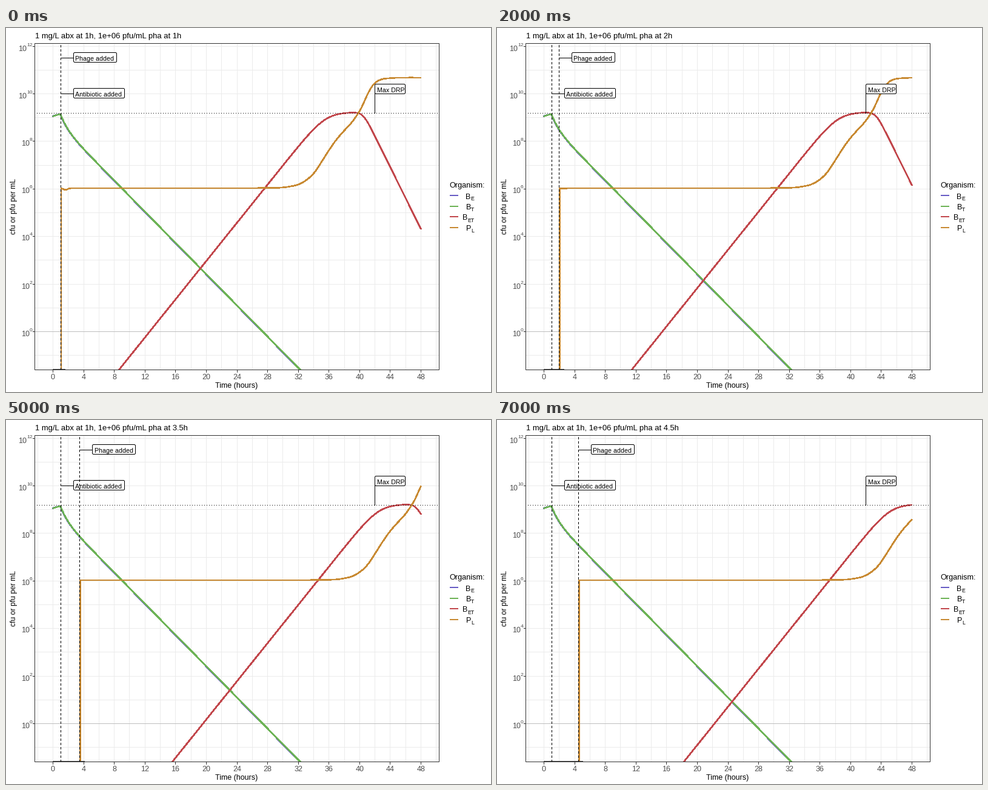
A matplotlib script for the animation above (8000 ms loop, 800 px wide and 600 px high).

```python
import itertools

import matplotlib.pyplot as plt
import numpy as np
from matplotlib.animation import FuncAnimation
from matplotlib.patches import FancyBboxPatch, Rectangle

W, H, DPI = 800, 600, 100
PX = 72 / DPI  # points per pixel
LEFT, RIGHT, TOP, BOTTOM = 47, 714, 24, 562
BLUE, GREEN, RED, ORANGE = "#685cc4", "#6db356", "#c2484d", "#c88a33"
GREY, DARK, GRID = "#4d4d4d", "#333333", "#ebebeb"
FRAMES = 8

plt.rcParams["font.family"] = "Liberation Sans"
fig = plt.figure(figsize=(W / DPI, H / DPI), dpi=DPI, facecolor="white")
ax = fig.add_axes([0, 0, 1, 1])
layer = itertools.count(1)


def hour_x(h):
    return 77 + 12.646 * h


def decade_y(d):
    return 499 - 39.2 * d


def softplus(v, width):
    return width * np.logaddexp(0, v / width)


def smooth(x, knots):
    """Cubic Hermite curve through a few (x, y) knots."""
    kx, ky = np.array(knots, float).T
    slope = np.gradient(ky, kx)
    i = np.clip(np.searchsorted(kx, x) - 1, 0, len(kx) - 2)
    step = kx[i + 1] - kx[i]
    u = (x - kx[i]) / step
    return ((1 + 2 * u) * (1 - u) ** 2 * ky[i] + u * (1 - u) ** 2 * step * slope[i]
            + u * u * (3 - 2 * u) * ky[i + 1] + u * u * (u - 1) * step * slope[i + 1])


PHAGE = [(-60, 264), (380, 264), (400, 264), (430, 263.5), (457, 262.8),
         (470, 261), (482, 258), (495, 251), (508, 239), (520, 221.5),
         (533, 201), (545, 184), (558, 169), (570, 156), (580, 142),
         (586, 132), (591, 121), (597, 108), (604, 96), (612, 88),
         (620, 84.5), (633, 82.7), (650, 82), (700, 82)]


def line(xs, ys, color, width=1, dash=None, clip=None):
    style = (0, dash) if dash else "-"
    art, = ax.plot(xs, ys, color=color, lw=width * PX, ls=style, zorder=next(layer),
                   antialiased=False, solid_capstyle="butt")
    if clip is not None:
        art.set_clip_path(clip)


def stroke(xs, ys, color, clip=None):
    """Two-pixel line, centred on the upper edge of its pixel row."""
    line(xs, np.asarray(ys) - 1, color, 1.6, clip=clip)


def text(x, y, s, size, color="black", ha="left", **kw):
    ax.text(x, y, s, fontsize=size * PX, color=color, ha=ha,
            va=kw.pop("va", "baseline"), zorder=next(layer), **kw)


def tag(x, y, w, s):
    ax.add_patch(FancyBboxPatch(
        (x + 0.5, y - 0.5), w, 16, boxstyle="round,pad=0,rounding_size=2",
        fc="white", ec="black", lw=PX, zorder=next(layer)))
    text(x + 3.5, y + 13, s, 10.65)


def event(x, y, w, s):
    line([x, x], [BOTTOM, TOP], "black", dash=(4, 4))
    line([x, x + 21], [y, y], "black")
    tag(x + 21, y - 8, w, s)


def draw_grid():
    for h in range(-2, 51, 2):
        x = round(hour_x(h))
        line([x, x], [TOP, BOTTOM], GRID)
    for d in range(-1, 13):
        y = round(decade_y(d))
        line([LEFT, RIGHT], [y, y], GRID)


def draw_axes():
    ax.add_patch(Rectangle((LEFT, TOP), RIGHT - LEFT, BOTTOM - TOP, fill=False,
                           ec=DARK, lw=PX, zorder=next(layer)))
    for h in range(0, 49, 4):
        x = round(hour_x(h))
        line([x, x], [BOTTOM, BOTTOM + 4], DARK)
        text(x + 0.5, 578, str(h), 12.5, GREY, "center")
    for d in range(0, 13, 2):
        y = round(decade_y(d))
        line([LEFT - 3, LEFT], [y, y], DARK)
        text(43.5, y - 0.5, str(d), 8.5, GREY, "right")
        text(39 if d < 10 else 34.5, y + 7.5, "10", 12.5, GREY, "right")
    text(380, 592.5, "Time (hours)", 12.5, ha="center")
    text(19, 292.5, "cfu or pfu per mL", 12.1, ha="right", rotation=90, va="center")


def draw_legend():
    text(731, 261.5, "Organism:", 12.6)
    rows = [("B", "E", BLUE), ("B", "T", GREEN), ("B", "ET", RED), ("P", "L", ORANGE)]
    for i, (base, sub, color) in enumerate(rows):
        y = 276 + 17.5 * i
        stroke([732, 746], [y, y], color)
        text(772.5, y + 7.5, sub, 8.8, ha="right")
        sub_width = 8.8 * {"E": 0.667, "T": 0.611, "ET": 1.278, "L": 0.556}[sub]
        text(772.5 - sub_width, y + 4.5, base, 12.5, ha="right")


def draw_curves(k, phage_x, clip):
    shift = 18.1 * k - 0.1 * k * k

    x = np.linspace(77, 500, 420)
    before = 142.5 + 3.5 * ((90 - x) / 13) ** 2
    after = 562 + 1.017 * (x - 484) - 19 * np.exp(-np.maximum(x - 90, 0) / 12)
    y = np.where(x < 90, before, after)
    stroke(x - 0.5, y, BLUE, clip)
    stroke(x, y, GREEN, clip)

    x = np.linspace(170, 684.5, 515)
    u = x - shift
    growth = 562 - 1.246 * (u - 187.5)
    y = 138.7 + softplus(growth - 138.7, 17) + softplus(2.02 * (u - 589), 9)
    stroke(x, y, RED, clip)

    start = phage_x + 1.3
    x = np.linspace(start, 684.5, 600)
    dip = 2.8 / 2.5 ** k * np.exp(-((x - phage_x - 8.5) / 5) ** 2)
    y = smooth(x - shift, PHAGE) + dip
    stroke(np.r_[start, x], np.r_[BOTTOM + 3, y], ORANGE, clip)

    line([77, phage_x + 7.5], [561, 561], "#444444", clip=clip)


def draw(k):
    global layer
    layer = itertools.count(1)
    ax.clear()
    # Whole numbers snap onto pixel columns and rows with these limits.
    ax.set(xlim=(0, W), ylim=(H - 1, -1))
    ax.axis("off")
    clip = Rectangle((LEFT, TOP), RIGHT - LEFT, BOTTOM - TOP, fill=False, lw=0)
    ax.add_patch(clip)

    t = 1 + 0.5 * k
    phage_x = hour_x(t)
    draw_grid()
    line([LEFT, RIGHT], [499, 499], "#bebebe")
    draw_curves(k, phage_x, clip)

    line([LEFT, RIGHT], [139, 139], "black", dash=(1, 3))
    line([608, 608], [100, 139], "black")
    tag(608, 92, 50, "Max DRP")
    event(90, 107, 84, "Antibiotic added")
    event(round(phage_x), 48, 71, "Phage added")

    draw_axes()
    draw_legend()
    text(47.5, 16.5, f"1 mg/L abx at 1h, 1e+06 pfu/mL pha at {t:g}h", 13.05)
    return []


anim = FuncAnimation(fig, draw, frames=FRAMES, interval=1000,
                     init_func=lambda: [], repeat=True, repeat_delay=0)
plt.show()
```
